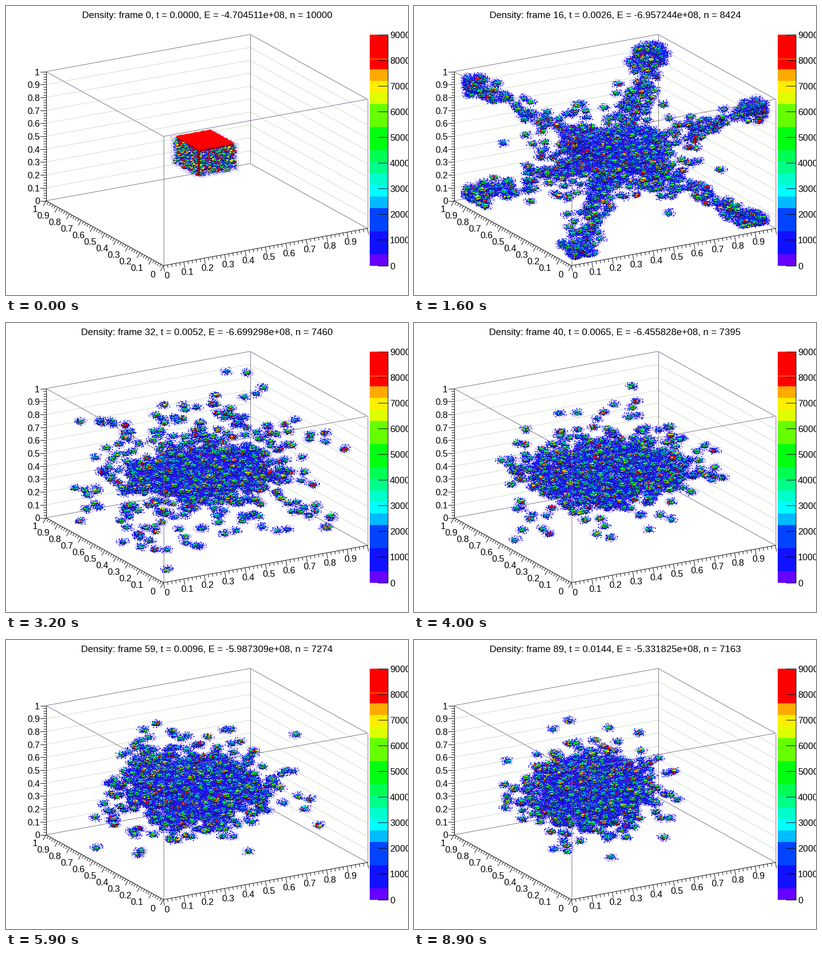
Write a matplotlib script that moves like this. It is 798 px wide and 575 px high and loops after 9 s.

```python
import numpy as np
import matplotlib.pyplot as plt
from matplotlib.animation import FuncAnimation
from matplotlib.collections import LineCollection
from matplotlib.colors import to_rgb
from matplotlib.patches import Rectangle

W, H, FRAMES = 798, 575, 90
CELL = 0.01
rng = np.random.default_rng(7)
plt.rcParams["font.family"] = "Liberation Sans"

# Parallel projection of the unit box
ORIGIN = np.array([313.0, 517.0])
AXES = np.array([[405.0, -74.0], [-233.0, -129.0], [0.0, -257.0]])
TOWARD = np.array([-1.0, -1.74, 1.16])

PALETTE = ["#6600ff", "#1111ff", "#1111ff", "#0044ff", "#0044ff", "#00bbff",
           "#00ffff", "#00ffcc", "#00ff88", "#00ff55", "#00ff11", "#00ff11",
           "#66ff00", "#66ff00", "#ddff00", "#ffee00", "#ffaa00",
           "#ff0000", "#ff0000", "#ff0000"]
VOXEL_RGB = (np.array([to_rgb(c) for c in ["#4410e0"] + PALETTE[1:]]) * 255).astype(np.uint8)

# Values read at a few moments, interpolated between
KEYS = [0, 16, 32, 49, 59, 73, 89]
ENERGY = [-4.704511, -6.957244, -6.699298, -6.181924, -5.987309, -5.606880, -5.331825]
COUNT = [10000, 8424, 7460, 7321, 7274, 7217, 7163]
EXTENT = np.array([[.09, .10, .09], [.18, .18, .12], [.29, .22, .10], [.26, .22, .14],
                   [.23, .23, .16], [.22, .22, .18], [.20, .21, .23]])
CENTRE = np.array([[.495, .51, .47], [.50, .50, .475], [.49, .52, .46], [.47, .54, .45],
                   [.46, .55, .45], [.45, .58, .43], [.44, .60, .42]])


def project(p):
    return ORIGIN + np.asarray(p) @ AXES


def keyed(table, i):
    return np.array([np.interp(i, KEYS, col) for col in table.T])


def smooth(x):
    x = np.clip(x, 0, 1)
    return x * x * (3 - 2 * x)


# Particles: a core, eight jets toward the corners, and strays
N_CORE, N_JET, N_STRAY = 600, 960, 110
N = N_CORE + N_JET + N_STRAY
JET = slice(N_CORE, N_CORE + N_JET)
STRAY = slice(N_CORE + N_JET, N)

q_start = rng.uniform(-1, 1, (N, 3)) * rng.random((N, 1)) ** 0.25
q_swing = rng.normal(0, 0.5, (N, 3))
spin = rng.uniform(0.5, 1.1, (N, 1))
peak = rng.uniform(0.35, 1.25, (N, 1))
scatter = rng.normal(0, 0.03, (N, 3))

aim = np.sign(q_start)
aim[STRAY] = rng.normal(size=(N_STRAY, 3))
aim[STRAY] *= 1.1 / np.linalg.norm(aim[STRAY], axis=1, keepdims=True)
drift = rng.normal(size=(N, 3))
drift *= 1.2 / np.linalg.norm(drift, axis=1, keepdims=True)

reach = rng.uniform(0.2, 1.4, (N, 1))
reach[STRAY] = rng.uniform(0.45, 1.0, (N_STRAY, 1))
turn = 0.85 + 0.75 * reach ** 2
exit_at = turn * 2 / np.pi * np.arcsin(np.minimum(0.92 / reach, 1))
escapes = (reach > 0.92)[:, 0]
escapes[:N_CORE] = escapes[STRAY] = False

# Cells touched by one particle, far ones first
ball = np.indices((7, 7, 7)).reshape(3, -1).T - 3
ball = ball[(ball ** 2).sum(1) <= 9]
ball = ball[np.argsort(ball @ TOWARD)]
grain = rng.random((N, len(ball)))


def positions(i):
    tau = i / 16
    ext, mid = keyed(EXTENT, i), keyed(CENTRE, i)
    q = q_start * np.cos(spin * tau) + q_swing * np.sin(spin * tau)
    width = np.ones((N, 1))
    width[N_CORE:] = 0.3 + 0.7 * smooth((tau - 1) / 1.5)
    out = np.zeros((N, 1))
    fade = np.exp(-0.35 * max(0, tau - 2))
    out[JET] = (reach * np.sin(np.pi / 2 * tau / turn))[JET] * fade
    out[STRAY] = (reach[STRAY] * np.sin(np.pi / 2 * min(tau / 1.5, 1))
                  * (1 - 0.05 * max(0, tau - 1.5)))
    mix = np.full((N, 1), smooth((tau - 1.5) / 2))
    mix[STRAY] = np.clip((tau - 1) / 14, 0, 1)
    heading = aim * (1 - mix) + drift * mix
    spread = scatter * min(tau, 1)
    pos = np.clip(mid + q * ext * width + spread + 0.5 * out * heading, 0.04, 0.96)
    return pos, ~(escapes & (tau > exit_at[:, 0]))


def cloud(i):
    """Dense coloured middle of each particle in a loose indigo halo."""
    pos, alive = positions(i)
    ids = np.flatnonzero(alive)
    ids = ids[np.argsort(pos[ids] @ TOWARD)]
    pos = pos[ids] / CELL
    cells = np.floor(pos)[:, None] + ball + 0.5
    r2 = ((cells - pos[:, None]) ** 2).sum(2)
    noise = grain[ids]
    value = peak[ids] * (0.8 + 0.3 * noise) * np.exp(-(r2 / 2) ** 2)
    value = np.maximum(value, 0.07 * noise ** 2)
    keep = (r2 < 4) | (noise > 0.35)
    return cells[keep] * CELL, value[keep]


def start_block():
    shape = np.array([21, 24, 22])
    g = np.indices(shape).reshape(3, -1).T
    noise = np.random.default_rng(3).random(len(g))
    value = noise ** 6
    shell = ((g == 0) | (g == shape - 1)).any(1)
    value[shell] = 0.04
    inner = ((g[:, :2] >= 2) & (g[:, :2] < shape[:2] - 2)).all(1)
    value[inner & (g[:, 2] >= 20)] = 1
    value[(g[:, 0] == 1) & (g[:, 1] == 1) & (g[:, 2] > 2)] = 0.9
    keep = ~shell | inner | (noise > 0.35)
    pos = np.array([0.39, 0.39, 0.36]) + (g[keep] + 0.5) * CELL
    order = np.argsort(pos @ TOWARD)
    return pos[order], value[keep][order]


def paint(pos, value):
    """Boxes sized and coloured by value, later ones in front."""
    img = np.zeros((H, W, 4), np.uint8)
    side = np.clip(np.rint(5 * np.minimum(value, 1) ** 0.4), 1, 5).astype(int)
    corner = np.rint(project(pos) - side[:, None] / 2).astype(int)
    rgb = VOXEL_RGB[np.minimum(value * 20, 19).astype(int)]
    area = side * side
    cell = np.repeat(np.arange(len(side)), area)
    k = np.arange(len(cell)) - np.repeat(np.cumsum(area) - area, area)
    s = side[cell]
    dy, dx = np.divmod(k, s)
    x = np.clip(corner[cell, 0] + dx, 0, W - 1)
    y = np.clip(corner[cell, 1] + dy, 0, H - 1)
    color = rgb[cell]
    color[(s >= 3) & (dy == s - 1)] = 0
    img[y, x, :3] = color
    img[y, x, 3] = 255
    return img


fig = plt.figure(figsize=(W / 100, H / 100), dpi=100, facecolor="white")
ax = fig.add_axes([0, 0, 1, 1])
ax.axis("off")
PX = 0.72  # points per pixel


def label(x, y, s, ha="center", size=18):
    return ax.text(x, y + 6.5, s, ha=ha, va="baseline", fontsize=size * PX, zorder=6)


def lines(segs, color, z, width=1.0, style="solid"):
    ax.add_collection(LineCollection(np.asarray(segs) - 0.5, colors=color, zorder=z,
                                     linewidths=width * PX, linestyles=style))


def path(*pts):
    p = project(pts)
    return list(zip(p[:-1], p[1:]))


def ticks(axis, normal, major=12, minor=6):
    segs = []
    for n in range(51):
        v = np.zeros(3)
        v[axis] = n / 50
        a = project(v)
        segs.append((a, a + np.array(normal) * (minor if n % 5 else major)))
    return segs


# Box, grid and axes
grid = []
for n in range(1, 10):
    grid += path((0, 1, n / 10), (1, 1, n / 10), (1, 0, n / 10))
lines(grid, "#8fbd8a", 1, 1, (0, (1, 1)))
EDGE = "#75697f"
lines(path((0, 1, 1), (1, 1, 1), (1, 0, 1), (1, 0, 0), (1, 1, 0), (0, 1, 0))
      + path((1, 1, 0), (1, 1, 1)), EDGE, 2)
lines(path((0, 1, 1), (0, 0, 1), (1, 0, 1)) + path((0, 0, 1), (0, 0, 0)), EDGE, 4)
lines(path((0, 1, 1), (0, 1, 0), (0, 0, 0), (1, 0, 0)), "black", 5)
lines(ticks(0, (0.18, 0.98)) + ticks(1, (-0.485, 0.875)), "black", 5)
z_ticks = np.array(ticks(2, (-1, 0))) + np.array([-233, -129])
lines(z_ticks, "black", 5)

for n in range(11):
    v = n / 10
    name = f"{v:g}"
    label(67, 388 - 257 * v, name, "right")
    label(296 - 233 * v, 533 - 129 * v, name, "right")
    if n < 10:
        label(319 + 405 * v, 535.5 - 74 * v, name)

# Colour scale
for n, c in enumerate(PALETTE):
    ax.add_patch(Rectangle((722, 517 - 23 * (n + 1)), 36, 23, facecolor=c,
                           edgecolor="none", antialiased=False, zorder=3))
scale = [((758, 57), (758, 517))]
for n in range(10):
    y = 517 - 460 * n / 9
    scale.append(((738, y), (758, y)))
    label(762, y, str(1000 * n), "left")
lines(scale, "black", 5)
mark, = ax.plot([722, 757], [104.5, 104.5], color="#ffaa00", lw=PX, zorder=4)

title = label(399, 18, "", size=18.93)
voxels = ax.imshow(np.zeros((H, W, 4), np.uint8), extent=(0, W, H, 0),
                   interpolation="nearest", aspect="auto", zorder=3)
ax.set_xlim(0, W)
ax.set_ylim(H, 0)


def update(i):
    voxels.set_data(paint(*(cloud(i) if i else start_block())))
    energy = np.interp(i, KEYS, ENERGY)
    count = round(np.interp(i, KEYS, COUNT))
    title.set_text(f"Density: frame {i}, t = {i * 0.000162:.4f}, "
                   f"E = {energy:.6f}e+08, n = {count}")
    mark.set_visible(i < FRAMES - 1)
    return voxels, title, mark


anim = FuncAnimation(fig, update, frames=FRAMES, interval=100, repeat=True,
                     repeat_delay=0, init_func=lambda: update(0))
plt.show()
```
